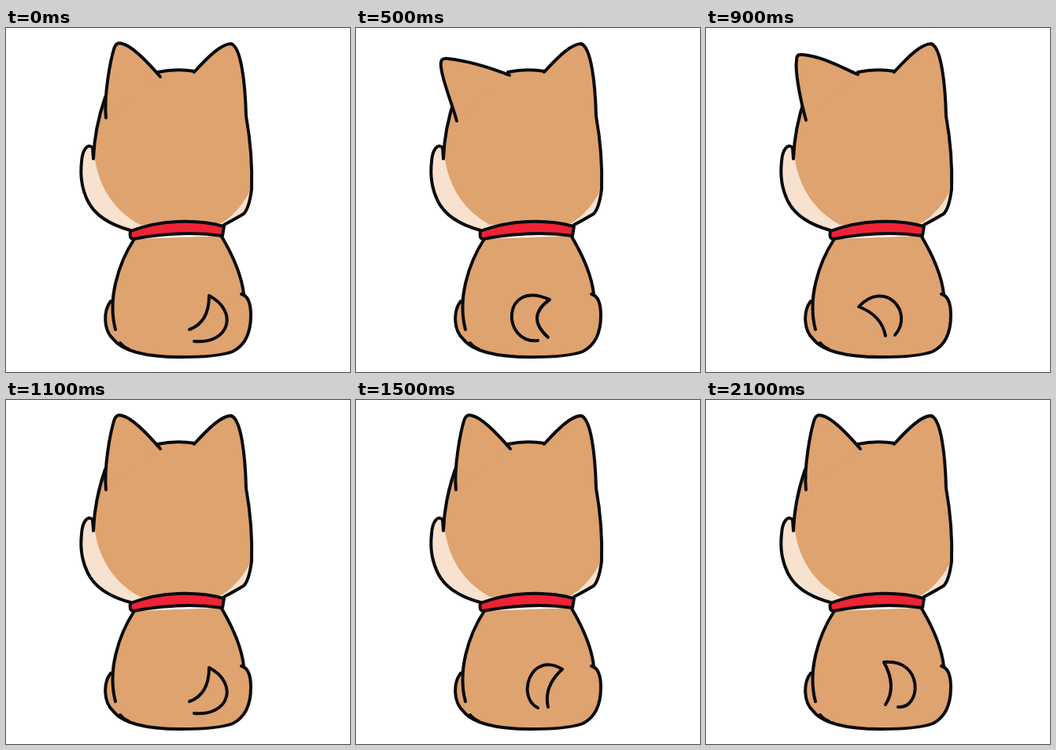
An HTML page for the animation above (2200 ms loop, 437 by 437 pixels).

```html
<!DOCTYPE html>
<html lang="en">
<head>
<meta charset="utf-8">
<title>Dog from behind</title>
<style>
html, body { margin: 0; width: 100%; height: 100%; overflow: hidden; background: #fff; }
svg { display: block; width: 100vw; height: 100vh; }
.fur { fill: #dea36f; }
.cream { fill: #f7e1cf; }
.line { fill: none; }
.line, .ear, .collar { stroke: #0b0b0d; stroke-width: 4; stroke-linecap: round; stroke-linejoin: round; }
.collar { fill: #ee2336; }

.flick {
  --up: path("M127 114C124 85 133 40 137 27C139 20 142 18 148 20C160 23 178 41 196 62");
  --tilt: path("M127 117C119 88 113 55 115 41C115 34 118 33 124 34C150 37 172 50 193 59");
  --lean: path("M128 118C122 96 109 65 108 49C107 41 109 38 117 39C145 42 172 51 195 60");
  --flop: path("M141 119C126 107 108 92 103 79C101 72 102 71 110 69C140 61 165 56 193 58");
  d: var(--up);
  animation: flick 2.2s step-end infinite;
}
@keyframes flick {
  0% { d: var(--up); }
  4.54% { d: var(--tilt); }
  9.09% { d: var(--lean); }
  13.63% { d: var(--flop); animation-timing-function: steps(2); }
  22.72% { d: var(--lean); }
  27.27% { d: var(--tilt); }
  31.81% { d: var(--up); }
  36.36% { d: var(--tilt); }
  40.9% { d: var(--tilt); animation-timing-function: steps(2); }
  50%, 100% { d: var(--up); }
}

/* Outer curve to the tip, then the inner curve back; two wags per ear cycle */
.tail { animation: wag 1.1s step-end infinite; }
@keyframes wag {
  0%, 100% { d: path("M239 398C284 402 296 360 258 340Q258 374 233 383"); }
  9.09% { d: path("M239 399C273 411 299 387 274 348Q265 381 233 384"); }
  18.18% { d: path("M239 399C262 420 302 414 289 357Q271 387 233 384"); }
  27.27% { d: path("M233 382C231 344 292 336 292 392Q267 379 242 394"); }
  36.36% { d: path("M231 391C203 377 222 318 262 342Q238 364 244 390"); }
  45.45% { d: path("M231 397C185 402 184 318 246 345Q215 367 244 393"); }
  54.54% { d: path("M231 400C184 410 172 362 210 346Q209 374 240 390"); }
  63.63% { d: path("M232 400C204 416 168 390 192 352Q205 380 239 386"); }
  72.72% { d: path("M239 384C222 372 200 384 180 374Q205 402 233 396"); }
  81.81% { d: path("M240 390C265 362 228 318 194 354Q223 365 228 391"); }
  90.9% { d: path("M244 390C274 393 277 328 226 333Q243 364 228 387"); }
}
</style>
</head>
<body>
<svg viewBox="0 0 437 437">
  <!-- body -->
  <path class="fur" d="M163 268C145 296 136 322 133 347C123 360 124 384 136 397C150 413 185 418 222 418C250 418 275 416 288 411C306 402 311 385 311 365C311 350 307 340 299 338L302 338C298 310 287 288 274 264Z"/>
  <path class="line" d="M163 268C142 300 129 345 139 383M274 265C287 287 299 311 302 338M133 347C123 360 124 384 136 395C150 413 185 418 222 418C250 418 275 416 288 411C306 402 311 385 311 365C311 350 307 340 299 338M145 400Q149 405 156 408"/>
  <path class="line tail" d="M239 398C284 402 296 360 258 340Q258 374 233 383"/>

  <!-- head -->
  <path class="cream" d="M111 152C104 146 97 154 96 170C94 188 97 206 104 220C114 240 136 251 158 257L180 252L120 160Z"/>
  <path class="fur" d="M111 166C113 140 117 116 126 88L150 68L193 56Q216 51 240 56C258 35 274 20 287 20C299 28 303 70 305 112C310 140 313 175 312 205C303 222 290 238 274 248L170 250C138 232 119 204 113 167Z"/>
  <path class="cream" d="M312 203C303 222 290 238 274 249L278 250L302 235C308 226 311 216 312 203Z"/>
  <path class="line" d="M110 152C104 146 97 154 96 170C94 188 97 206 104 220C114 240 136 251 158 257M110 152L111 166C112 139 117 114 126 88M193 56Q216 51 240 55M239 56C258 35 274 20 286 20C299 24 304 72 305 112C310 140 313 175 312 205C310 220 307 231 302 236Q292 242 277 250"/>
  <path class="fur ear flick" d="M127 114C124 85 133 40 137 27C139 20 142 18 148 20C160 23 178 41 196 62"/>

  <path class="collar" d="M158 258C195 244 240 242 277 252L275 264C240 259 200 261 162 268Q156 268 158 258Z"/>
</svg>
</body>
</html>
```
